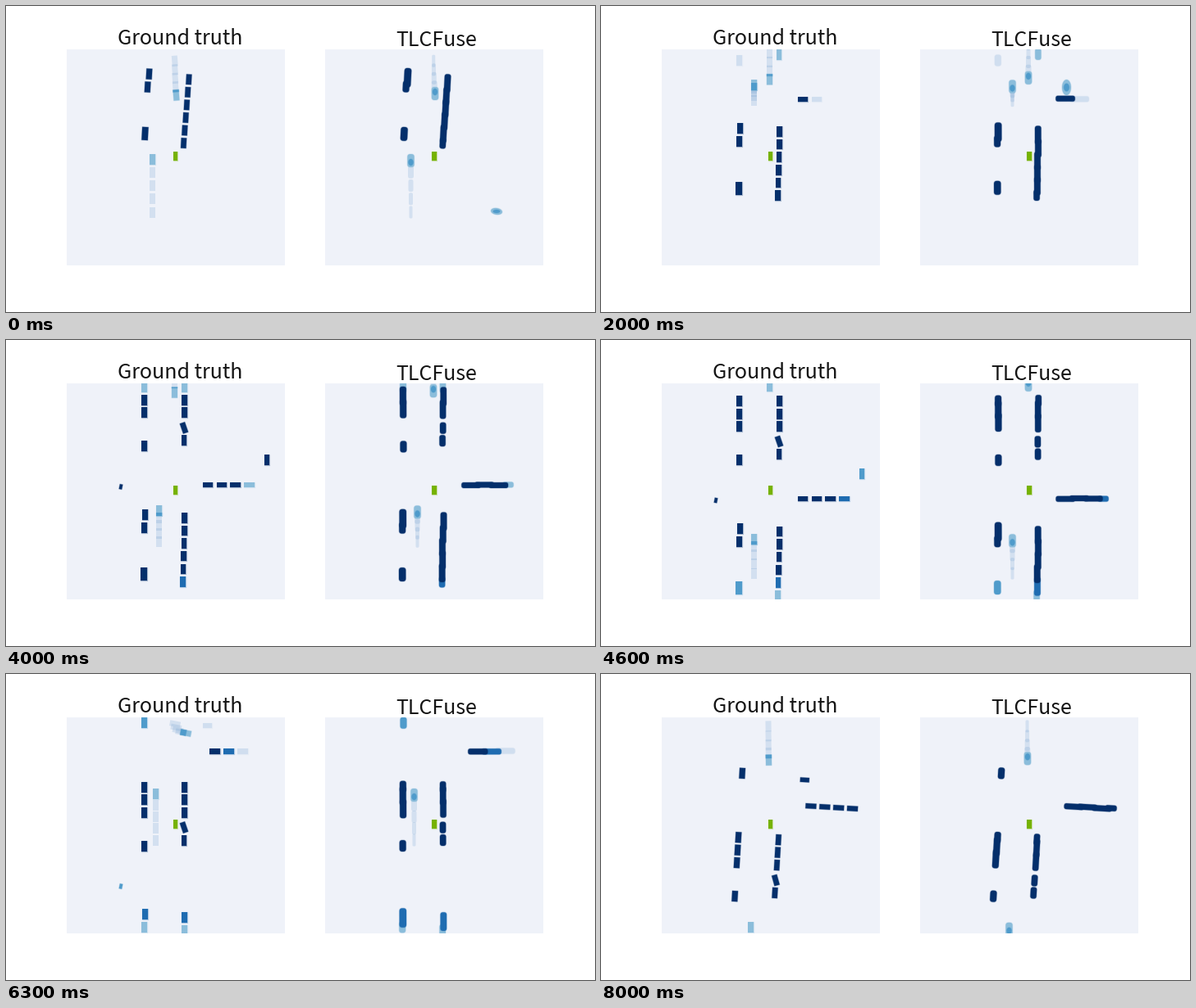
Write a matplotlib script that moves like this. It is 718x374 px and loops after 8300 ms.

```python
import numpy as np
import matplotlib.pyplot as plt
from matplotlib.animation import FuncAnimation
from matplotlib.patches import Polygon, Rectangle

W, H, DPI = 718, 374, 100
TICKS, TICK_MS = 83, 100
SLICES = 5          # time slices laid over each other
SHIFT = 315.5       # from the left panel to the right one
NEVER = 99

RAMP = ["#d0deef", "#8bbddb", "#4f9bcb", "#1f6cb1", "#042f6b"]
MID, CORE = RAMP[1], RAMP[2]
FUTURE = (112 / 255, 160 / 255, 208 / 255, 0.22)
EGO = np.array([206.3, 183.7])

fig = plt.figure(figsize=(W / DPI, H / DPI), dpi=DPI, facecolor="white")
ax = fig.add_axes([0, 0, 1, 1])
ax.set_xlim(0, W)
ax.set_ylim(H, 0)
ax.axis("off")


def panel(x, title, mid, base):
    area = Rectangle((x, 52.7), 265.8, 264.6, fc="#eff2f9", ec="none")
    ax.add_patch(area)
    ax.text(mid, base, title, size=25 * 72 / DPI, color="#141414",
            family="Noto Sans CJK JP", ha="center", va="baseline")
    return area


truth = panel(73.8, "Ground truth", 211.7, 46.7)
pred = panel(389.3, "TLCFuse", 524.5, 48.8)


def drive(step):
    """Distance the ego car has covered."""
    return np.interp(step, [0, 4, 8, 13, 18, 25, 32],
                     [0, 33, 64.5, 103.5, 145, 208.5, 272.5])


def heading(step):
    return np.interp(step, [0, 4, 27, 32], [0.055, 0, 0, 0.06])


def rotate(pts, angle, center):
    c, s = np.cos(angle), np.sin(angle)
    return (pts - center) @ np.array([[c, s], [-s, c]]) + center


def box(x, y, w, h, tilt=0):
    corners = np.array([(-w, -h), (w, -h), (w, h), (-w, h)]) / 2 + (x, y)
    return rotate(corners, tilt, (x, y))


def blob(x, y, w, h):
    """Bar with rounded ends."""
    t = np.linspace(0, 2 * np.pi, 40, endpoint=False) + 0.01
    c, s = np.cos(t), np.sin(t)
    cap = min(w, h) / 2
    u = np.sign(c) * (np.abs(c) ** 0.7 * cap + w / 2 - cap)
    v = np.sign(s) * (np.abs(s) ** 0.7 * cap + h / 2 - cap)
    return np.column_stack([x + u, y + v])


def oval(x, y, w, h):
    t = np.linspace(0, 2 * np.pi, 40, endpoint=False)
    return np.column_stack([x + np.cos(t) * w / 2, y + np.sin(t) * h / 2])


cars = []


def park(x, y, n=1, dx=0, dy=0, w=7, h=13, tilt=0,
         first=-9, gap=0, last=NEVER, seen=-9):
    """Row of n cars; each shows up gap steps after the one before."""
    for j in range(n):
        link = (dx, dy) if j < n - 1 else (0, 0)
        cars.append(dict(x=x + j * dx, y=y + j * dy, w=w, h=h, tilt=tilt,
                         first=first + j * gap, last=last, seen=seen,
                         link=link))


# left kerb
park(169, 85, n=2, dx=-1, dy=16)
park(168, 158, w=7.5, h=16)
park(168.5, 1.5, first=8)
park(168.5, -39.5, n=3, dy=-15.5)
park(168.5, -149)
# right kerb
park(217.7, 89, n=6, dx=-0.4, dy=15.6, w=6.5, h=12.5)
park(217, -5.5, w=6.5)
park(217, -21, w=6.5, tilt=-0.33)
park(217.4, -39.5, n=3, dy=-15.5, w=6.5)
# side streets
park(246, 49, n=4, dx=16.8, w=12.5, h=6, first=4, gap=3.4, last=23)
park(254.5, -114, n=4, dx=16.9, w=13, h=6.2, first=19, gap=3)
park(245, -145.5, w=11, h=5.5, first=25, seen=NEVER)
park(317.5, 18.5, w=6, first=9, last=21, seen=NEVER)
park(140, 51, w=3.5, h=6, tilt=0.2, first=12, last=28, seen=NEVER)

# first step, x, swing of a turn, y, speed, acceleration, first detection
movers = [
    (0, 205.5, 2, 109, -2, -0.05, 0),
    (0, 178, 0, 187, 24.5, 0, 0),
    (2, 186, 0, 41.4, 7.1, 0.345, 3),
    (20, 182, 0, 29, 23.4, 0, 20),
    (24, 204, 25, 63, 9.6, -0.54, 27),
]

# false detections that last one step: step, x, y, width, height, tilt
ghosts = [(0, 598, 251, 14, 8, 0.15), (8, 567.5, 99.5, 11, 19, 0)]

drawn = []


def put(area, pts, color, soft=True):
    patch = Polygon(pts, closed=True, fc=color, ec="none")
    layers = [patch]
    if soft:
        layers.insert(0, Polygon(pts, closed=True, fc="none", ec=color,
                                 lw=0.9, alpha=0.3))
    for p in layers:
        ax.add_patch(p)
        p.set_clip_path(area)
        drawn.append(p)


def level(car, step):
    """How many time slices contain a parked car, fewer near the edges."""
    y = car["y"] + drive(step)
    return int(min(SLICES, step - car["first"] + 1, car["last"] - step,
                   np.ceil((y - 45) / 7), np.ceil((325 - y) / 9)))


def draw_parked(step):
    rng = np.random.default_rng(step)
    far, turn = drive(step), heading(step)
    live = [(level(c, step), c) for c in cars]
    for n, c in sorted(live, key=lambda item: item[0]):
        if n <= 0:
            continue
        x, y, w, h = c["x"], c["y"] + far, c["w"], c["h"]
        put(truth, rotate(box(x, y, w, h, c["tilt"]), turn, EGO), RAMP[n - 1])
        if step >= c["seen"]:
            # a detection runs on towards the next car in the row
            dx, dy = 0.6 * np.array(c["link"])
            wobble = rng.uniform(-0.5, 0.5, 2)
            pts = blob(x + dx / 2 + wobble[0], y + dy / 2 + wobble[1],
                       w + abs(dx) + 0.9, h + abs(dy) + 0.9)
            put(pred, rotate(pts, turn, EGO) + (SHIFT, 0), RAMP[n - 1])


def path(mover, step, now):
    """Place of a moving car at a step, seen from the ego car now."""
    first, x, swing, y, speed, accel, _ = mover
    s = step - first
    return np.array([x + swing * np.exp(-s / 2),
                     y + speed * s + accel * s * s + drive(now) - drive(step)])


def ego_shift(step):
    """Drive continues at its last pace beyond the end of the loop."""
    return max(step - 32, 0) * (drive(32) - drive(31))


def draw_mover(mover, step):
    if step < mover[0]:
        return
    spots = [path(mover, step + j, step) - (0, ego_shift(step + j))
             for j in range(SLICES)]
    head = spots[0]
    dx, dy = spots[1] - head
    side = 1 if dy > 0 else -1
    tilt = np.arctan2(-dx * side, dy * side)
    for x, y in spots[:0:-1]:
        put(truth, box(x, y, 7, 13, tilt), FUTURE, soft=False)
    put(truth, box(*head, 7, 13, tilt), MID)
    overlap = 13 - np.hypot(dx, dy)
    if overlap > 0:
        put(truth, box(*(head + spots[1]) / 2, 7, overlap, tilt), CORE)

    if step >= mover[-1]:
        for j in range(SLICES - 1, 0, -1):
            x, y = spots[j] + (SHIFT, 0)
            put(pred, blob(x, y, 8 - j, 15), FUTURE, soft=False)
        x, y = head + (SHIFT, 2 * side)
        put(pred, blob(x, y, 8.4, 16), MID)
        put(pred, oval(x, y + 2 * side, 6, 8), CORE)


def draw_ghosts(step):
    for when, x, y, w, h, tilt in ghosts:
        if when == step:
            put(pred, rotate(oval(x, y, w, h), tilt, (x, y)), MID)
            put(pred, oval(x, y, w * 0.6, h * 0.5), CORE)


def update(tick):
    for patch in drawn:
        patch.remove()
    drawn.clear()
    step = tick * 2 // 5  # the scene advances every 250 ms
    for mover in movers:
        draw_mover(mover, step)
    draw_parked(step)
    draw_ghosts(step)
    put(truth, box(*EGO, 5.4, 10.6), "#76b200")
    put(pred, box(*(EGO + (SHIFT, 0)), 5.4, 10.6), "#76b200")
    return drawn


anim = FuncAnimation(fig, update, frames=TICKS, interval=TICK_MS,
                     repeat=True, repeat_delay=0, blit=False)
plt.show()
```
